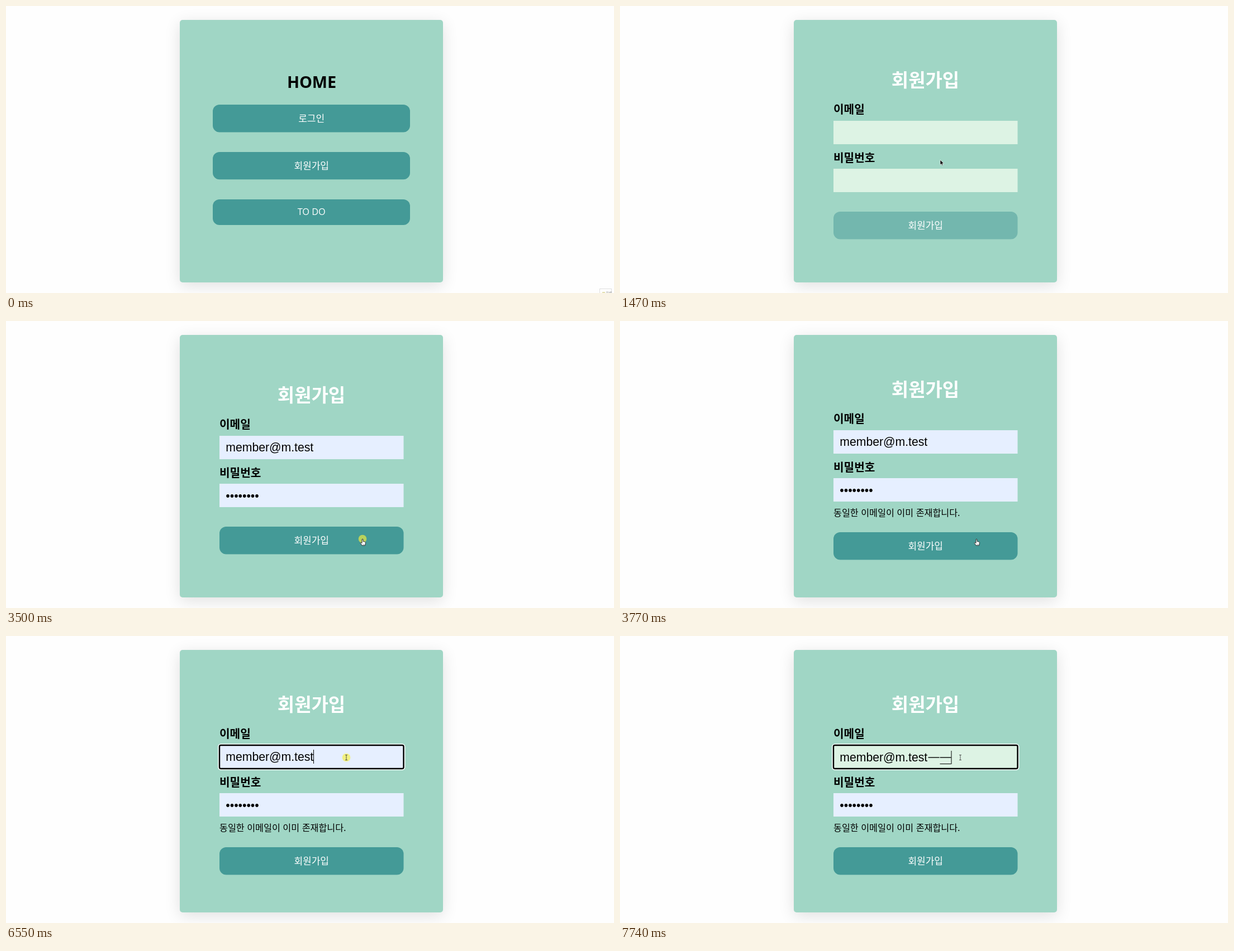
Write an HTML page that moves like this. It is 1088 px wide and 515 px high and loops after 8 s.

```html
<!DOCTYPE html>
<html lang="ko">
<head>
<meta charset="utf-8">
<title>회원가입</title>
<style>
  html, body { margin: 0; width: 100%; height: 100%; overflow: hidden; background: #fefefe; }
  #card { position: absolute; left: 311px; top: 25px; width: 471px; height: 471px;
          border-radius: 5px; background: #a0d6c5; box-shadow: 0 6px 28px rgba(0, 0, 0, .12); }
  svg { position: absolute; left: 0; top: 0; display: block; }
  text { font-family: "Noto Sans CJK KR", "Noto Sans CJK JP", "Noto Sans CJK", sans-serif; white-space: pre; }
  .latin { font-family: "Open Sans", "Noto Sans", sans-serif; }
  .input { font-family: "Liberation Sans", Arial, sans-serif; font-size: 21.2px; }
</style>
</head>
<body>
<div id="card"></div>
<svg id="stage" width="1088" height="515" viewBox="0 0 1088 515"></svg>
<script>
const LOOP = 8000;
const TICK = 67.2;
const stage = document.getElementById('stage');
const TEAL = '#449a97', DIM = '#73b7ae', MINT = '#ddf3e4', AUTOFILL = '#e6efff';
const EMAIL = 'member@m.test', OTHER_EMAIL = 'item@box.test';

// pointer hotspot: time, x, y
const path = [
  [320, 1052, 481], [390, 940, 390], [520, 750, 276], [650, 640, 238], [850, 573, 276],
  [1940, 573, 276], [2070, 535, 219],
  [2810, 535, 219], [3160, 638, 391],
  [3840, 638, 391], [4190, 592, 394], [4500, 383, 298], [4680, 392, 370], [4880, 503, 408],
  [5080, 503, 408], [5280, 501, 415], [5820, 612, 246], [6080, 616, 208], [6290, 609, 218]
];
const clicks = [[1330, 1470], [2470, 2540], [3430, 3570], [6550, 6620]];

const between = (t, a, b) => t >= a && t < b;

function pointerAt(time) {
  const t = 320 + Math.floor((time - 315) / TICK) * TICK;
  const i = path.findIndex(k => k[0] > t);
  if (i < 0) return path[path.length - 1].slice(1);
  if (i === 0) return path[0].slice(1);
  const a = path[i - 1], b = path[i], u = (t - a[0]) / (b[0] - a[0]);
  return [a[1] + (b[1] - a[1]) * u, a[2] + (b[2] - a[2]) * u];
}

const rect = (x, y, w, h, fill, r = 0, extra = '') =>
  `<rect x="${x}" y="${y}" width="${w}" height="${h}" rx="${r}" fill="${fill}" ${extra}/>`;
const circle = (x, y, r, fill, extra = '') => `<circle cx="${x}" cy="${y}" r="${r}" fill="${fill}" ${extra}/>`;
const line = (x1, y1, x2, y2, color, width) =>
  `<path d="M${x1} ${y1}L${x2} ${y2}" stroke="${color}" stroke-width="${width}"/>`;
const text = (str, x, y, attrs) => `<text x="${x}" y="${y}" ${attrs}>${str}</text>`;

// Hangul centred vertically on cy
const hangul = (str, x, cy, size, fill, extra = '') =>
  text(str, x, cy + size * .37, `font-size="${size}" fill="${fill}" ${extra}`);
const MIDDLE = 'text-anchor="middle"', BOLD = 'font-weight="700"';

function homePage() {
  return text('HOME', 547, 147, `class="latin" font-size="28.8" ${BOLD} ${MIDDLE}`) +
    rect(370, 177, 353, 49.5, TEAL, 12) + hangul('로그인', 546.7, 202, 17, '#fff', MIDDLE) +
    rect(370, 262, 353, 49.3, TEAL, 12) + hangul('회원가입', 546.7, 287, 17, '#fff', MIDDLE) +
    rect(370, 347, 353, 46, TEAL, 12) +
    text('TO DO', 546.7, 375, `class="latin" font-size="16.3" fill="#fff" ${MIDDLE}`);
}

function focusRing(y) {
  return rect(380, y - 2, 333.5, 46, 'none', 4.5, 'stroke="#fff" stroke-width="1.6"') +
    rect(382, y, 329.5, 42, 'none', 2.5, 'stroke="#000" stroke-width="2.4"');
}

function savedLogins() {
  const entry = (mail, y) => circle(452, y + 3, 3.6, '#4fa9bd') +
    text(mail, 464, y, 'class="latin" font-size="7.2" fill="#f1f3f4"') +
    text('--------', 464, y + 12.5, 'class="latin" font-size="9.6" fill="#e0e2e5"');
  return rect(440, 253, 106, 100, 'rgba(0,0,0,.25)', 3, 'transform="translate(0 1)"') +
    rect(440, 253, 106, 99.5, '#292a2d', 3) +
    '<path d="M446 253.5L452 248L458 253.5Z" fill="#292a2d"/>' +
    entry(EMAIL, 269) + entry(OTHER_EMAIL, 303) +
    line(440, 326.5, 546, 326.5, '#3f4246', 1) +
    circle(452, 340, 4, '#9aa0a6') +
    hangul('비밀번호 관리...', 464, 339.5, 8.2, '#9aa0a6') +
    circle(530.5, 339.5, 2, 'none', 'stroke="#5ea3d8" stroke-width="1.4"') +
    line(533, 339.5, 538.5, 339.5, '#9aa0a6', 1.4) + line(537, 339.5, 537, 341.5, '#9aa0a6', 1.2);
}

function typedDashes(t) {
  const count = t < 7740 ? 1 : 2;
  let out = '';
  for (let i = 0; i < count; i++) out += line(551.5 + i * 21, 218, 571.5 + i * 21, 218, '#000', 1.4);
  const start = 551.5 + (count - 1) * 21;
  return out + line(start, 229.5, start + 20, 229.5, '#000', 1) +
    line(start + 20.5, 206, start + 20.5, 230, '#000', 1);
}

function signupPage(t) {
  const filled = t >= 2270, rejected = t >= 3630, typing = t >= 7540;
  const focused = between(t, 2470, 3430) || t >= 6550;
  const up = rejected ? -10 : 0;
  const buttonY = 369 - up;
  const emailY = 206 + up, passwordY = 292 + up;
  let out = hangul('회원가입', 546.5, 132.5 + up, 33, '#fff', `${BOLD} ${MIDDLE}`) +
    hangul('이메일', 382, 186 + up, 20.2, '#000', BOLD) +
    hangul('비밀번호', 382, 273 + up, 20.2, '#000', BOLD) +
    rect(382, emailY, 329.5, 42, filled && !typing ? AUTOFILL : MINT) +
    rect(382, passwordY, 329.5, 42, filled ? AUTOFILL : MINT) +
    rect(382, buttonY, 329.5, 49.5, filled ? TEAL : DIM, 12) +
    hangul('회원가입', 546.7, buttonY + 25, 17, '#fff', MIDDLE);
  if (filled) {
    out += text(EMAIL, 393.3, emailY + (typing ? 29.2 : 27.6), 'class="input"') +
      text('•'.repeat(8), 393.3, passwordY + 28.7, 'class="input"');
  }
  if (rejected) out += hangul('동일한 이메일이 이미 존재합니다.', 382, 344, 16.2, '#000');
  if (focused) out += focusRing(emailY);
  if (between(t, 2470, 3000)) out += line(533.5, 215, 533.5, 238, '#000', 1);
  if (between(t, 6550, 7080)) out += line(550.5, 204, 550.5, 229, '#000', 1);
  if (typing) out += typedDashes(t);
  if (between(t, 2470, 3430)) out += savedLogins();
  return out;
}

function pointerKind(t, x, y) {
  const up = t >= 3630 ? -10 : 0;
  const inside = (left, right, top, height) => between(x, left, right) && between(y, top, top + height);
  if (t < 1400) return [177, 262, 347].some(top => inside(370, 723, top, 49)) ? 'hand' : 'arrow';
  if (inside(382, 712, 206 + up, 42) || inside(382, 712, 292 + up, 42)) return 'beam';
  return inside(382, 712, 369 - up, 49) ? 'hand' : 'arrow';
}

const pointers = {
  arrow: '<path d="M0 0V9.2L2.1 7.3L3.6 10.6L5 10L3.6 6.8H6.4Z" fill="#000" stroke="#fff" stroke-width=".7"/>',
  hand: '<path d="M-1 .8Q0 -.5 1 .8V4.6L4.6 5.3Q5.6 5.6 5.4 7L4.6 11.8H-.8L-3.8 7.4Q-3.7 6 -2.4 6.6L-1 7.8Z"' +
    ' fill="#fff" stroke="#222" stroke-width=".9"/><path d="M1 9V11M2.8 9V11" stroke="#666" stroke-width=".5"/>',
  beam: '<path d="M-2 -4.5H2M-2 4.5H2M0 -4.5V4.5" fill="none" stroke="#444" stroke-width=".9"/>'
};

function pointer(t) {
  if (t < 320) return '';
  const [x, y] = pointerAt(t);
  const pressed = clicks.some(([from, to]) => between(t, from, to));
  return (pressed ? circle(x, y, 7.3, '#f7ef3c', 'opacity=".65"') : '') +
    `<g transform="translate(${x.toFixed(1)} ${y.toFixed(1)})">${pointers[pointerKind(t, x, y)]}</g>`;
}

function cornerTip() {
  return rect(1062.5, 507.5, 21, 12, '#fff', 0, 'stroke="#ddd"') +
    rect(1067, 513, 5, 2, '#e3dfb0') + hangul('검색', 1073, 515, 6, '#888');
}

let shown = '';
function draw() {
  const t = performance.now() % LOOP;
  const markup = (t < 1400 ? homePage() : signupPage(t)) + (t < 70 ? cornerTip() : '') + pointer(t);
  if (markup !== shown) stage.innerHTML = shown = markup;
  requestAnimationFrame(draw);
}
draw();
</script>
</body>
</html>
```
